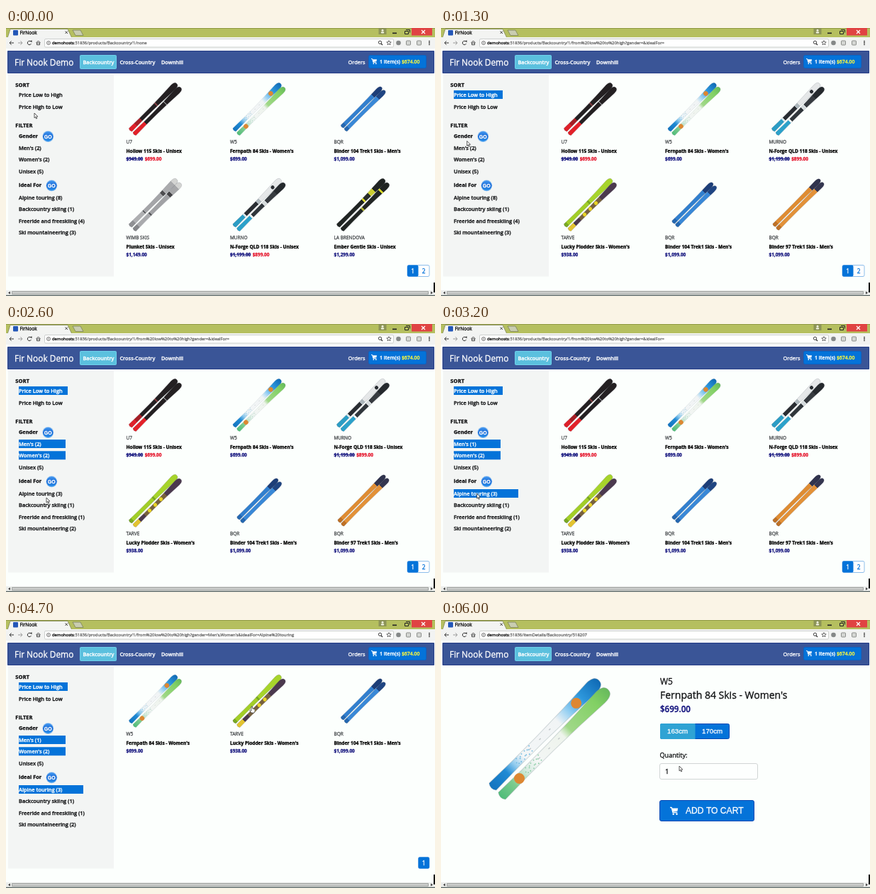
Animation of 605x378 px, one loop 6100 ms. Source, as an HTML page with a canvas:

```html
<!DOCTYPE html>
<html lang="en">
<head>
<meta charset="utf-8">
<title>FirNook</title>
<style>
  html, body { margin: 0; width: 100%; height: 100%; overflow: hidden; background: #fcfffd; }
  canvas { display: block; width: 605px; height: 378px; }
</style>
</head>
<body>
<canvas id="stage" width="605" height="378"></canvas>
<script>
const ctx = document.getElementById('stage').getContext('2d');
const LOOP = 6100, STEP = 100;
const BLUE = '#0473d9', EDGE = '#0748b4', NAVY = '#14147e', RED = '#e5142b', INK = '#101113', PAGE = '#fcfffd';
const SANS = '"Open Sans", "Noto Sans", sans-serif';
const ARIAL = '"Liberation Sans", Arial, sans-serif';

// Moments at which the page state changes.
const AT = { sort: 600, men: 1500, women: 2200, alpine: 3200, go: 4100, detail: 4900, size: 5700 };

// Pointer path: time, x, y.
const PATH = [
  [0, 40, 120], [100, 40, 119], [500, 34, 95], [900, 34, 94], [1400, 37, 167],
  [1800, 38, 179], [2200, 38, 184], [2600, 57, 245], [2800, 56, 241], [3300, 50, 239],
  [3700, 62, 219], [4200, 62, 219], [4700, 346, 122], [4950, 346, 124],
  [5400, 323, 177], [5600, 330, 158], [5750, 331, 158], [6000, 336, 206], [6100, 336, 206]
];

// Ski colours from tail to tip: [end of band, colour]; dot: [ski, position, colour].
const SKIS = {
  ember: { a: [[.13, '#df2029'], [.24, '#a51e25'], [.55, '#242022'], [.57, '#77393c'], [1, '#242022']],
           b: [[.25, '#e32129'], [.66, '#242022'], [.68, '#7d7d80'], [1, '#242022']] },
  fern: { soft: true,
          a: [[0, '#1272bd'], [.15, '#1f8ad4'], [.22, '#8fcaee'], [.3, '#f3f6f7'], [.62, '#f1f4f5'], [.72, '#8fcdf2'], [.84, '#2d97dc'], [1, '#0f69b4']],
          b: [[0, '#4dbb78'], [.13, '#7ccb8e'], [.25, '#d6ebe0'], [.34, '#f3f6f5'], [.58, '#eef4ec'], [.64, '#a0d888'], [.88, '#82d064'], [1, '#66b95c']],
          dots: [[0, .79, '#dd8732'], [1, .18, '#dd8732']] },
  azure: { slim: true,
           a: [[.09, '#2568b1'], [.78, '#317fce'], [1, '#1d3e78']],
           b: [[.09, '#2568b1'], [.82, '#3988d7'], [1, '#1f4582']] },
  amber: { slim: true, wide: true,
           a: [[.08, '#bf7126'], [.8, '#df8c32'], [1, '#30334d']],
           b: [[.08, '#bf7126'], [.84, '#e39138'], [1, '#343650']] },
  ash: { a: [[.1, '#8f9093'], [.3, '#aeafb1'], [.32, '#505255'], [.68, '#a4a5a8'], [.73, '#4d4d50'], [.92, '#aaabad'], [1, '#d3d4d2']],
         b: [[.1, '#858689'], [.34, '#a9aaad'], [.36, '#55575a'], [.74, '#a1a2a5'], [.79, '#434346'], [.92, '#a6a7a9'], [1, '#d3d4d2']] },
  frost: { a: [[.22, '#2b9dc5'], [.25, '#d5e3e8'], [.5, '#292d32'], [.56, '#aeb8bd'], [1, '#e5e7e8']],
           b: [[.28, '#2ba1ca'], [.31, '#edf1f2'], [.55, '#30363b'], [.61, '#d5dbdd'], [.8, '#373b40'], [1, '#25292d']],
           dots: [[0, .83, '#292d32']] },
  lime: { a: [[.06, '#79a923'], [.5, '#a2ce27'], [.53, '#79a923'], [1, '#a7d42b']],
          b: [[.13, '#e2c330'], [.24, '#4c394b'], [.68, '#77613d'], [1, '#4b394e']],
          dots: [[1, .34, '#ead527'], [1, .46, '#ead527'], [1, .58, '#ead527']] },
  coal: { a: [[.54, '#202422'], [.57, '#d4d529'], [.68, '#292d29'], [.77, '#cbce31'], [1, '#202422']],
          b: [[.44, '#202422'], [.47, '#a7ad32'], [.82, '#222624'], [.85, '#d4d529'], [1, '#202422']] }
};

const item = (ski, brand, name, price, sale) => ({ ski, brand, name, price, sale });
const HOLLOW = item('ember', 'U7', 'Hollow 115 Skis - Unisex', '$949.00', '$699.00');
const FERN = item('fern', 'W5', "Fernpath 84 Skis - Women's", '$699.00');
const BINDER = item('azure', 'BQR', "Binder 104 Trek1 Skis - Men's", '$1,099.00');
const BINDER_B = item('amber', 'BQR', "Binder 97 Trek1 Skis - Men's", '$1,099.00');
const FORGE = item('frost', 'MURNO', 'N-Forge QLD 118 Skis - Unisex', '$1,199.00', '$899.00');
const PLODDER = item('lime', 'TARVE', "Lucky Plodder Skis - Women's", '$938.00');
const PLUNKET = item('ash', 'WIMB SKIS', 'Plunket Skis - Unisex', '$1,149.00');
const EMBER = item('coal', 'LA BRENDOVA', 'Ember Gentle Skis - Unisex', '$1,299.00');

const LISTS = {
  start: [HOLLOW, FERN, BINDER, PLUNKET, FORGE, EMBER],
  sorted: [HOLLOW, FERN, FORGE, PLODDER, BINDER, BINDER_B],
  filtered: [FERN, PLODDER, BINDER]
};

function rect(x, y, w, h, fill, radius = 0, stroke) {
  ctx.beginPath();
  ctx.roundRect(x, y, w, h, radius);
  if (fill) { ctx.fillStyle = fill; ctx.fill(); }
  if (stroke) { ctx.strokeStyle = stroke; ctx.lineWidth = 1; ctx.stroke(); }
}

// A box whose one-pixel border lies inside its bounds.
const box = (x, y, w, h, fill, edge, radius = 0) => rect(x + .5, y + .5, w - 1, h - 1, fill, radius, edge);

function disc(x, y, r, fill) {
  ctx.beginPath();
  ctx.arc(x, y, r, 0, 7);
  ctx.fillStyle = fill;
  ctx.fill();
}

function line(points, color, width = 1) {
  ctx.beginPath();
  points.forEach(([x, y]) => ctx.lineTo(x, y));
  ctx.strokeStyle = color;
  ctx.lineWidth = width;
  ctx.stroke();
}

function poly(points, fill, stroke) {
  ctx.beginPath();
  points.forEach(([x, y]) => ctx.lineTo(x, y));
  ctx.closePath();
  ctx.fillStyle = fill;
  ctx.fill();
  if (stroke) { ctx.strokeStyle = stroke; ctx.lineWidth = .8; ctx.stroke(); }
}

// Draws slightly thickened text on a baseline and returns its right edge.
function text(str, x, y, size, color = INK, weight = 400, family = SANS) {
  ctx.font = `${weight} ${size}px ${family}`;
  ctx.fillStyle = ctx.strokeStyle = color;
  ctx.lineWidth = .3;
  ctx.lineJoin = 'round';
  ctx.fillText(str, x, y);
  ctx.strokeText(str, x, y);
  return x + ctx.measureText(str).width;
}

function skiPath(len, tail, waist, tip) {
  ctx.beginPath();
  ctx.moveTo(4, -tail);
  ctx.quadraticCurveTo(len * .45, -waist, len - 16, -tip);
  ctx.bezierCurveTo(len - 4, -tip, len, -tip * .6, len, 0);
  ctx.bezierCurveTo(len, tip * .6, len - 4, tip, len - 16, tip);
  ctx.quadraticCurveTo(len * .45, waist, 4, tail);
  ctx.quadraticCurveTo(-1, 0, 4, -tail);
  ctx.closePath();
}

function paint(bands, len, soft) {
  const g = ctx.createLinearGradient(0, 0, len, 0);
  let from = 0;
  for (const [end, color] of bands) {
    if (!soft) g.addColorStop(from, color);
    g.addColorStop(end, color);
    from = end;
  }
  return g;
}

// A pair of skis in a square box of 172 units.
function skiPair(name, x, y, scale) {
  const { a, b, soft, slim, wide, dots = [] } = SKIS[name];
  const len = slim ? (wide ? 214 : 184) : 216, inset = slim ? (wide ? 2 : 12) : 0;
  ctx.save();
  ctx.translate(x, y);
  ctx.scale(scale, scale);
  [a, b].forEach((bands, i) => {
    const shift = slim ? 1 + i * 11 : i * 13;
    ctx.save();
    ctx.translate(4 + inset + shift, 156 - inset + shift);
    ctx.rotate(-Math.PI / 4);
    skiPath(len, slim ? 6.5 : 7, slim ? 4.5 : 4, slim ? 8 : 9.8);
    ctx.fillStyle = paint(bands, len, soft);
    ctx.fill();
    ctx.strokeStyle = soft ? '#7f8f9555' : '#3a444b66';
    ctx.lineWidth = 1;
    ctx.stroke();
    dots.filter(d => d[0] === i).forEach(d => disc(d[1] * len, 0, soft ? 7.5 : 6, d[2]));
    if (soft) {
      for (let k = 0; k < 16; k++) {
        disc(len * (.24 + k * .009), Math.sin(k * 2.4) * 4.5, .9, i ? '#8bcda6' : '#6db8df');
      }
      for (const p of [.36, .45, .54]) rect(len * p, -1, 3, 1.4, '#c3c9cb');
    }
    ctx.restore();
  });
  ctx.restore();
}

function cart(x, y, s, color) {
  ctx.save();
  ctx.translate(x, y);
  ctx.scale(s, s);
  line([[0, 0], [2, 0], [3.6, 6.4], [9.2, 6.4]], color, 1.2);
  poly([[2.2, 1], [10, 1], [9.2, 4.8], [3, 5.5]], color);
  disc(4.2, 8.3, 1.1, color);
  disc(8.5, 8.3, 1.1, color);
  ctx.restore();
}

function browser(path) {
  rect(0, 0, 605, 14, '#b5bf5f');
  rect(0, 0, 605, 1, '#959d4c');
  poly([[2, 14], [6, 1.5], [87, 1.5], [93, 14]], '#f3f4f2', '#7f8652');
  rect(10, 3, 7, 7.5, '#2457b8', 1);
  text('FirNook', 19.5, 9.3, 6.6, '#111');
  line([[83.5, 4.5], [87, 8]], '#333', .9);
  line([[87, 4.5], [83.5, 8]], '#333', .9);
  poly([[94, 3], [105, 3], [109, 10.5], [98, 10.5]], '#c9cdb0', '#7d8258');

  rect(525.5, 0, 11, 9, '#8c9356');
  disc(531, 3.2, 1.5, '#f0f2df');
  rect(528.8, 5.2, 4.4, 2.4, '#f0f2df', 1);
  rect(545, 6.5, 6, 1.6, '#222');
  box(562, 4, 6, 5, null, '#222');
  line([[564, 2.5], [569.5, 2.5], [569.5, 6.5]], '#222');
  rect(572, 0, 29, 10.5, '#e04343');
  line([[586, 3], [591, 8]], '#fff', 1.3);
  line([[591, 3], [586, 8]], '#fff', 1.3);

  rect(0, 13, 605, 16, '#f2f3f2');
  rect(54.5, 15.5, 492, 11.5, '#fff', 1.5, '#cdd0ce');
  for (const [x, d, color] of [[8, -1, '#333'], [20, 1, '#999']]) {
    line([[x - 3, 21], [x + 3, 21]], color, 1);
    line([[x + d * .5, 18.4], [x + d * 3, 21], [x + d * .5, 23.6]], color, 1);
  }
  ctx.beginPath();
  ctx.arc(33, 21, 2.7, .4, 5.5);
  ctx.strokeStyle = '#333';
  ctx.stroke();
  poly([[34, 18], [36.7, 17.4], [36.3, 20.4]], '#333');
  line([[42.5, 21], [45.5, 18], [48.5, 21]], '#444', 1);
  rect(43.5, 21, 4, 2.7, null, 0, '#444');
  ctx.beginPath();
  ctx.arc(60, 21, 2.5, 0, 7);
  ctx.strokeStyle = '#555';
  ctx.lineWidth = .8;
  ctx.stroke();
  rect(59.6, 19.8, .8, 2.5, '#555');
  const end = text('demohosts', 65, 23.2, 5.9, '#111');
  text(':51836/' + path, end, 23.2, 5.9, '#6a6a6a');

  ctx.beginPath();
  ctx.arc(527.5, 20.3, 2.1, 0, 7);
  ctx.strokeStyle = '#333';
  ctx.lineWidth = 1;
  ctx.stroke();
  line([[529, 22], [531, 24]], '#333', 1.2);
  const star = Array.from({ length: 10 }, (_, i) => {
    const r = i % 2 ? 1.5 : 3.4, a = i * Math.PI / 5 - Math.PI / 2;
    return [540 + r * Math.cos(a), 21 + r * Math.sin(a)];
  });
  poly(star, '#fff', '#444');
  disc(553.5, 21, 3.3, '#858888');
  box(564, 17.5, 7, 7, '#d5d7d4', '#8c8e8b', 1);
  box(579, 17.5, 7, 7, '#d5d7d4', '#8c8e8b', 1);
  for (const y of [18.7, 21, 23.3]) disc(597, y, .9, '#333');
}

function navbar() {
  rect(0, 29, 605, 349, PAGE);
  box(2, 32, 602, 32, '#3a5597', '#263c86');
  text('Fir Nook Demo', 12, 53, 11.9, '#fff');
  box(104, 38, 52, 20, '#5bc0de', '#6fd2ec', 1);
  text('Backcountry', 108.5, 51, 7.3, '#fff', 600);
  text('Cross-Country', 160.5, 51, 7.3, '#fff', 600);
  text('Downhill', 219, 51, 7.3, '#fff', 600);
  text('Orders', 482.5, 51, 7.5, '#fff');
  box(511, 38, 82, 19, BLUE, '#0a62c4', 2);
  cart(515, 43.5, .8, '#fff');
  const end = text('1 item(s) ', 527, 50, 7, '#fff', 600);
  text('$674.00', end, 50, 6.9, '#f8f540', 600);
}

function scrollbar() {
  rect(0, 370, 605, 8, '#eceeec');
  box(8, 371, 588, 5, '#c9cbc9', '#a2a5a3');
  poly([[3, 373.5], [6, 371.5], [6, 375.5]], '#444');
  poly([[602, 373.5], [599, 371.5], [599, 375.5]], '#444');
  rect(0, 376.7, 605, 1.3, '#56615f');
  rect(603, 359, 2, 14, '#111');
}

function goButton(x, y) {
  const g = ctx.createLinearGradient(0, y - 8, 0, y + 8);
  g.addColorStop(0, '#4fa2f4');
  g.addColorStop(.5, '#1165d5');
  g.addColorStop(1, '#359cf0');
  disc(x, y, 8, '#a9cdf0');
  disc(x, y, 7.2, g);
  ctx.textAlign = 'center';
  text('GO', x, y + 2.6, 7, '#fff', 700, ARIAL);
  ctx.textAlign = 'left';
}

function option(label, y, selectedWidth) {
  if (selectedWidth) rect(18, y - 6, selectedWidth, 12, BLUE);
  text(label, 18, y + 2.8, 7.4, selectedWidth ? '#fff' : INK, 600);
}

function sidebar(t) {
  const men = t >= AT.men, women = t >= AT.women, alpine = t >= AT.alpine;
  const counts = women ? [3, 1, 1, 2] : men ? [1, 1, 1, 1] : [8, 1, 4, 3];
  rect(3, 65, 149, 285.5, '#f3f5f4');
  text('SORT', 13.3, 83, 7.6, INK, 700);
  option('Price Low to High', 94, t >= AT.sort && 69);
  option('Price High to Low', 111);
  text('FILTER', 13.3, 139.7, 7.5, INK, 700);
  text('Gender', 18, 154.8, 7.4, INK, 700);
  goButton(59.3, 153);
  option(`Men's (${alpine ? 1 : 2})`, 169, men && 66);
  option("Women's (2)", 185.3, women && 66);
  option('Unisex (5)', 202);
  text('Ideal For', 18, 224.4, 7.4, INK, 700);
  goButton(64.3, 222.3);
  ['Alpine touring', 'Backcountry skiing', 'Freeride and freeskiing', 'Ski mountaineering']
    .forEach((label, i) => option(`${label} (${counts[i]})`, 239 + i * 16.4, i === 0 && alpine && 91));
}

function product({ ski, brand, name, price, sale }, i) {
  const x = 169.5 + (i % 3) * 146.5, dy = i > 2 ? 135 : 0;
  skiPair(ski, x + 3, 77 + dy, .436);
  text(brand, x, 162.5 + dy, 6.5, '#4c4f52');
  text(name, x, 176.4 + dy, 6.6, '#000', 700);
  const end = text(price, x, 186.6 + dy, 6.4, NAVY, 700);
  if (sale) {
    line([[x, 184.4 + dy], [end, 184.4 + dy]], NAVY, .8);
    text(sale, end + 2.5, 186.6 + dy, 6.4, RED, 700);
  }
}

function pager(pages) {
  const left = 597 - pages * 15.5;
  rect(left, 334.5, pages * 15.5, 16, '#fff', 2, '#8cbdea');
  rect(left, 334.5, 15.5, 16, BLUE, 2);
  text('1', left + 5.3, 345.7, 8.3, '#fff');
  if (pages > 1) text('2', left + 20.7, 345.7, 8.3, BLUE);
}

function catalogue(t) {
  sidebar(t);
  const list = t >= AT.go ? LISTS.filtered : t >= AT.sort ? LISTS.sorted : LISTS.start;
  list.forEach(product);
  pager(list.length > 3 ? 2 : 1);
}

function detail(t) {
  skiPair(FERN.ski, 66, 82, 1);
  text(FERN.brand, 309, 91.3, 12);
  text(FERN.name, 309, 110.8, 14);
  text(FERN.price, 309, 129.6, 11.6, NAVY, 600);
  box(309, 146, 98, 22, BLUE, EDGE, 2);
  if (t >= AT.size) rect(309, 146, 49.5, 22, '#2fa3d4', [2, 0, 0, 2]);
  text('163cm', 319, 160.3, 9.7, '#fff', 400, ARIAL);
  text('170cm', 368, 160.3, 9.7, '#fff', 400, ARIAL);
  text('Quantity:', 308.5, 193.7, 9.1);
  box(308, 202, 139, 23, '#fdfffe', '#d1d5d5', 2.5);
  text('1', 316, 217, 9.5);
  box(308, 254, 134, 30, BLUE, EDGE, 2.5);
  cart(323, 264.5, 1.12, '#fff');
  text('ADD TO CART', 345, 273.3, 12.1, '#fff', 400, ARIAL);
}

function pointerAt(t) {
  const i = PATH.findIndex((p, n) => n > 0 && t <= p[0]);
  const [t0, x0, y0] = PATH[i - 1], [t1, x1, y1] = PATH[i];
  const p = (t - t0) / (t1 - t0), e = p * p * (3 - 2 * p);
  return [x0 + (x1 - x0) * e, y0 + (y1 - y0) * e];
}

function pointer(t) {
  const [x, y] = pointerAt(t);
  const hand = (t >= 3600 && t <= 4200) || (t >= 4600 && t < AT.detail);
  ctx.save();
  ctx.translate(x, y);
  if (hand) {
    poly([[0, 0], [1.5, 0], [1.8, 3], [5, 3.8], [5, 7], [4, 9], [.2, 9], [-2.4, 5.5], [-1.6, 4.8], [0, 6]], '#fff', '#444');
  } else {
    poly([[0, 0], [0, 6.8], [1.5, 5.4], [2.6, 8], [3.7, 7.5], [2.7, 5], [4.8, 4.9]], '#fff', '#333');
  }
  ctx.restore();
}

function address(t) {
  if (t >= AT.detail) return 'itemDetails/Backcountry/518207';
  const base = 'products/Backcountry/1/';
  if (t < AT.sort) return base + 'none';
  const query = t >= AT.go ? "gender=Men's,Women's&idealFor=Alpine%20touring" : 'gender=&idealFor=';
  return base + 'from%20low%20to%20high?' + query;
}

function draw(now) {
  const t = Math.floor((now % LOOP) / STEP) * STEP;
  ctx.clearRect(0, 0, 605, 378);
  browser(address(t));
  navbar();
  (t >= AT.detail ? detail : catalogue)(t);
  scrollbar();
  pointer(t);
}

const began = performance.now();
function tick() {
  draw(performance.now() - began);
  requestAnimationFrame(tick);
}
tick();
</script>
</body>
</html>
```
